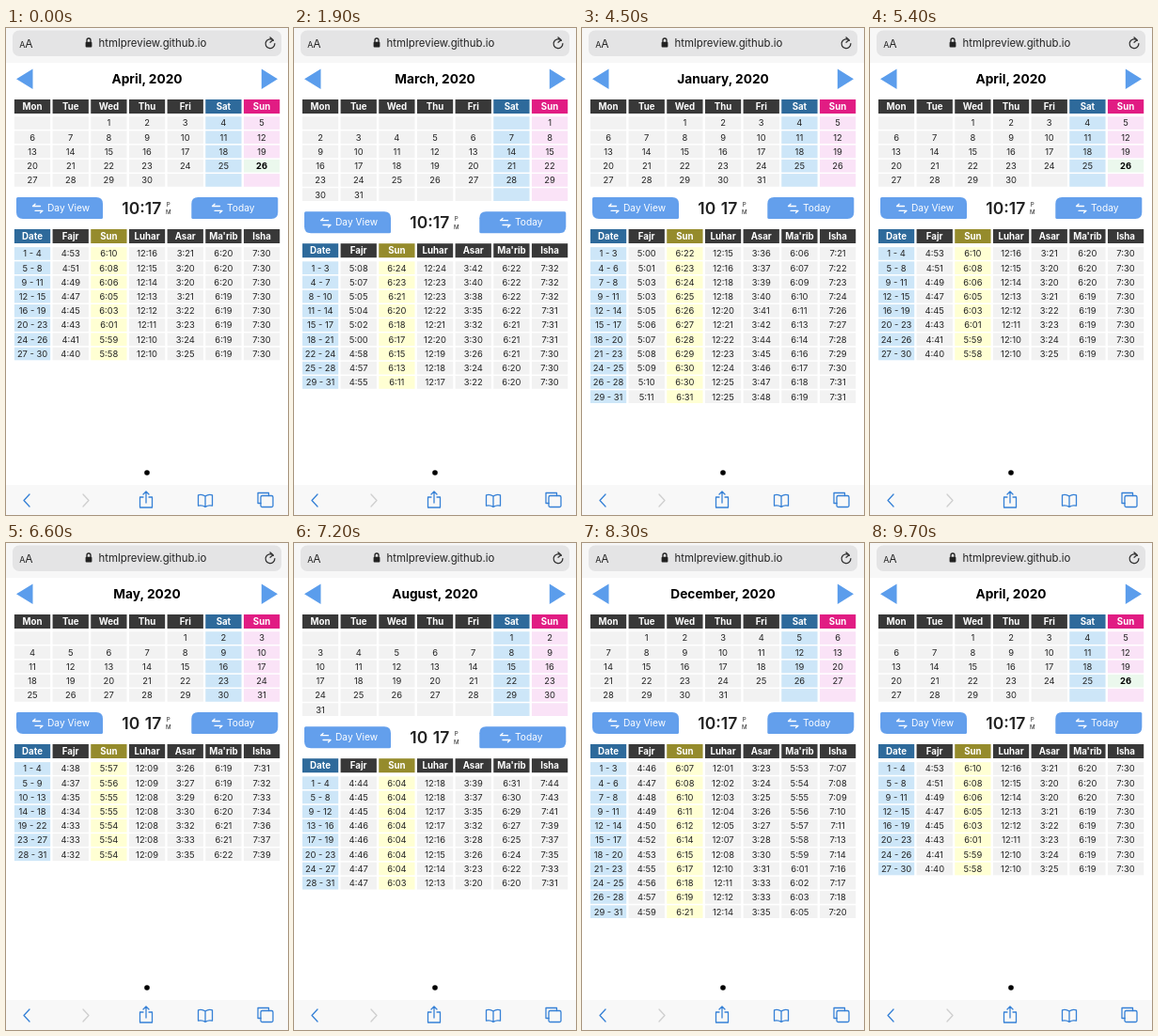
These frames come from a looping animation (300x518 px, 10000 ms). An HTML page:

```html
<!DOCTYPE html>
<html lang="en">
<head>
<meta charset="utf-8">
<title>Prayer times</title>
<style>
html, body { margin: 0; width: 100%; height: 100%; overflow: hidden; background: #fff; }
svg { display: block; width: 100vw; height: 100vh; }
text { font-family: Inter, Roboto, sans-serif; font-size: 9.4px; fill: #242424; text-anchor: middle; }
.head { font-size: 9.7px; font-weight: 700; fill: #fff; }
.title { font-size: 13.7px; font-weight: 700; fill: #000; }
.today { font-weight: 700; fill: #000; }
.clock { font-size: 17.5px; font-weight: 600; fill: #222; }
.half { font-size: 6.2px; fill: #222; }
.label { font-size: 10.2px; fill: #fff; text-anchor: start; }
.url { font-size: 11.4px; fill: #222; }
.line { fill: none; stroke-width: 1.3; stroke-linecap: round; stroke-linejoin: round; }
</style>
</head>
<body>
<svg viewBox="0 0 300 518">
  <defs>
    <path id="button" fill="#639fec" d="M12.500 180H96q7 0 7 7v14.500q0 1.500-1.500 1.500H18q-7 0-7-7v-14.500q0-1.500 1.500-1.500Z"/>
    <path id="swap" class="line" stroke="#fff" d="M36.500 189.500h-8l2.500-2.300M31 194.300h8l-2.500 2.300"/>
  </defs>
  <rect width="300" height="518" fill="#fff"/>
  <g id="chrome">
    <rect width="300" height="37" fill="#f7f7f7"/>
    <rect x="7" y="2.500" width="286" height="27.500" rx="7" fill="#e4e4e5"/>
    <rect y="486" width="300" height="32" fill="#f8f8f8"/>
    <text x="17.300" y="20.500" style="font-size:9px">A</text>
    <text x="24.300" y="20.500" style="font-size:12px">A</text>
    <path class="line" stroke="#222" d="M86 15v-2a2 2 0 0 1 4 0v2"/>
    <rect x="84.600" y="14.800" width="6.800" height="5.600" rx="1" fill="#222"/>
    <text class="url" x="156" y="20.300">htmlpreview.github.io</text>
    <path class="line" stroke="#333" d="M284.400 13.200a4.900 4.900 0 1 0 1.500 3.400M281 10l3.200 2.800-3.200 2.400"/>
    <circle cx="150" cy="473" r="2.800"/>
    <g class="line" stroke="#3580d6">
      <path d="M25 496l-6 6.500 6 6.500"/>
      <path stroke="#cfcfcf" d="M82 496l6 6.500-6 6.500"/>
      <path d="M146 499h-3.500v11h13v-11h-3.500M149 505v-11.500M146 496l3-3 3 3"/>
      <path d="M212 498q-3.500-2.500-7.500-1.200v11.400q4-1.200 7.500 1.200q3.500-2.400 7.500-1.200v-11.400q-4-1.300-7.500 1.200v11.400"/>
      <path d="M271 505.500h-3v-11h11.500v3"/>
      <rect x="271" y="497.500" width="13" height="12" rx="1.500"/>
    </g>
  </g>
  <g fill="#5b9dec">
    <path d="M11 54.300L28.500 43.500V65Z"/>
    <path d="M289 54.300L271.800 43.500V65Z"/>
  </g>
  <g id="months"></g>
  <g id="bar">
    <use href="#button"/>
    <use href="#button" transform="translate(300.300 0) scale(-1 1)"/>
    <use href="#swap"/>
    <use href="#swap" x="191"/>
    <text class="label" x="44" y="195">Day View</text>
    <text class="label" x="235" y="195">Today</text>
    <text class="clock" x="144.300" y="198">10<tspan id="colon">:</tspan>17</text>
    <text class="half" x="172.700" y="189.700">P</text>
    <text class="half" x="172.700" y="198.300">M</text>
  </g>
</svg>
<script>
const LOOP = 10000, STEP = 15.22, PITCH = 40.67, WIDTH = 38.3;
const DARK = '#383838', BLUE = '#2e6a9b', PALE_BLUE = '#cde6f8', GREY = '#f2f2f2';
const NAMES = ['January', 'February', 'March', 'April', 'May', 'June', 'July',
  'August', 'September', 'October', 'November', 'December'];
const DAYS = ['Mon', 'Tue', 'Wed', 'Thu', 'Fri', 'Sat', 'Sun'];
const PERIODS = [11, 8, 9, 8, 7, 8, 8, 8, 9, 9, 6, 11];

// Minutes past midnight or noon on the first of each month.
const CURVES = {
  Fajr: [300, 311, 308, 293, 278, 272, 277, 284, 287, 284, 281, 286],
  Sun: [382, 391, 384, 370, 357, 354, 358, 364, 363, 359, 359, 367],
  Luhar: [735, 746, 744, 736, 729, 729, 735, 738, 732, 722, 716, 721],
  Asar: [216, 228, 222, 201, 206, 216, 222, 219, 198, 191, 197, 203],
  "Ma'rib": [366, 380, 382, 380, 379, 383, 391, 391, 378, 362, 351, 353],
  Isha: [441, 452, 452, 450, 451, 460, 468, 464, 449, 433, 423, 427]
};

// [time, month]: back to January, Today, on to December, Today.
const VISITS = [[0, 3], [1900, 2], [2800, 1], [3700, 0], [5000, 3],
  ...[4, 5, 6, 7, 8, 9, 10, 11].map((m, i) => [6600 + 200 * i, m]), [9300, 3]];

const $ = id => document.getElementById(id);
const daysIn = m => new Date(2020, m + 1, 0).getDate();
const firstDay = m => (new Date(2020, m, 1).getDay() + 6) % 7;
const weeksIn = m => Math.ceil((firstDay(m) + daysIn(m)) / 7);
const shift = m => `translate(0 ${(weeksIn(m) - 5) * STEP})`;
const clock = n => Math.floor(n / 60) + ':' + String(n % 60).padStart(2, '0');

// Smooth yearly curve (Catmull-Rom) through the monthly points.
function curve(points, m, u) {
  const [a, b, c, d] = [11, 0, 1, 2].map(k => points[(m + k) % 12]);
  return b + u / 2 * (c - a + u * (2 * a - 5 * b + 4 * c - d + u * (3 * (b - c) + d - a)));
}

function timetable(m) {
  const days = daysIn(m), count = PERIODS[m];
  return Array.from({ length: count }, (_, i) => {
    const from = Math.round(i * days / count) + 1, to = Math.round((i + 1) * days / count);
    const times = Object.values(CURVES).map(p => clock(Math.round(curve(p, m, (from - 1) / days))));
    return [`${from} - ${to}`, ...times];
  });
}

function calendar(m) {
  const start = firstDay(m), days = daysIn(m);
  return Array.from({ length: weeksIn(m) }, (_, r) => DAYS.map((_, c) => {
    const d = r * 7 + c - start + 1;
    return d > 0 && d <= days ? String(d) : '';
  }));
}

function cell(col, y, h, fill, label, cls = '') {
  const x = 8.9 + col * PITCH;
  const box = `<rect x="${x}" y="${y}" width="${WIDTH}" height="${h}" fill="${fill}"/>`;
  return box + (label ? `<text class="${cls}" x="${x + WIDTH / 2}" y="${y + h / 2 + 3.4}">${label}</text>` : '');
}
const header = (labels, y, fills) =>
  labels.map((s, c) => cell(c, y, 15, fills[c] || DARK, s, 'head')).join('');
const body = (rows, y, fills, now) => rows.map((row, r) => row.map((s, c) => {
  const hit = now && s === now;
  return cell(c, y + r * STEP, 13.7, hit ? '#ebf8ed' : fills[c] || GREY, s, hit ? 'today' : '');
}).join('')).join('');

function month(m) {
  return `<g id="m${m}" display="none"><text class="title" x="150" y="59">${NAMES[m]}, 2020</text>`
    + header(DAYS, 76, { 5: BLUE, 6: '#e11c83' })
    + body(calendar(m), 94.2, { 5: PALE_BLUE, 6: '#fae3f7' }, m === 3 && '26')
    + `<g transform="${shift(m)}">`
    + header(['Date', ...Object.keys(CURVES)], 214, { 0: BLUE, 2: '#958b2c' })
    + body(timetable(m), 233.1, { 0: PALE_BLUE, 2: '#ffffd3' }) + '</g></g>';
}

$('months').innerHTML = NAMES.map((_, m) => month(m)).join('');

let shown = -1;
function draw() {
  const t = performance.now() % LOOP;
  const m = VISITS.filter(v => v[0] <= t).pop()[1];
  if (m !== shown) {
    if (shown >= 0) $('m' + shown).setAttribute('display', 'none');
    $('m' + m).removeAttribute('display');
    $('bar').setAttribute('transform', shift(m));
    shown = m;
  }
  $('colon').setAttribute('fill-opacity', Math.floor((t + 600) / 1000) % 2 ? 0 : 1);
  requestAnimationFrame(draw);
}
draw();
</script>
</body>
</html>
```
